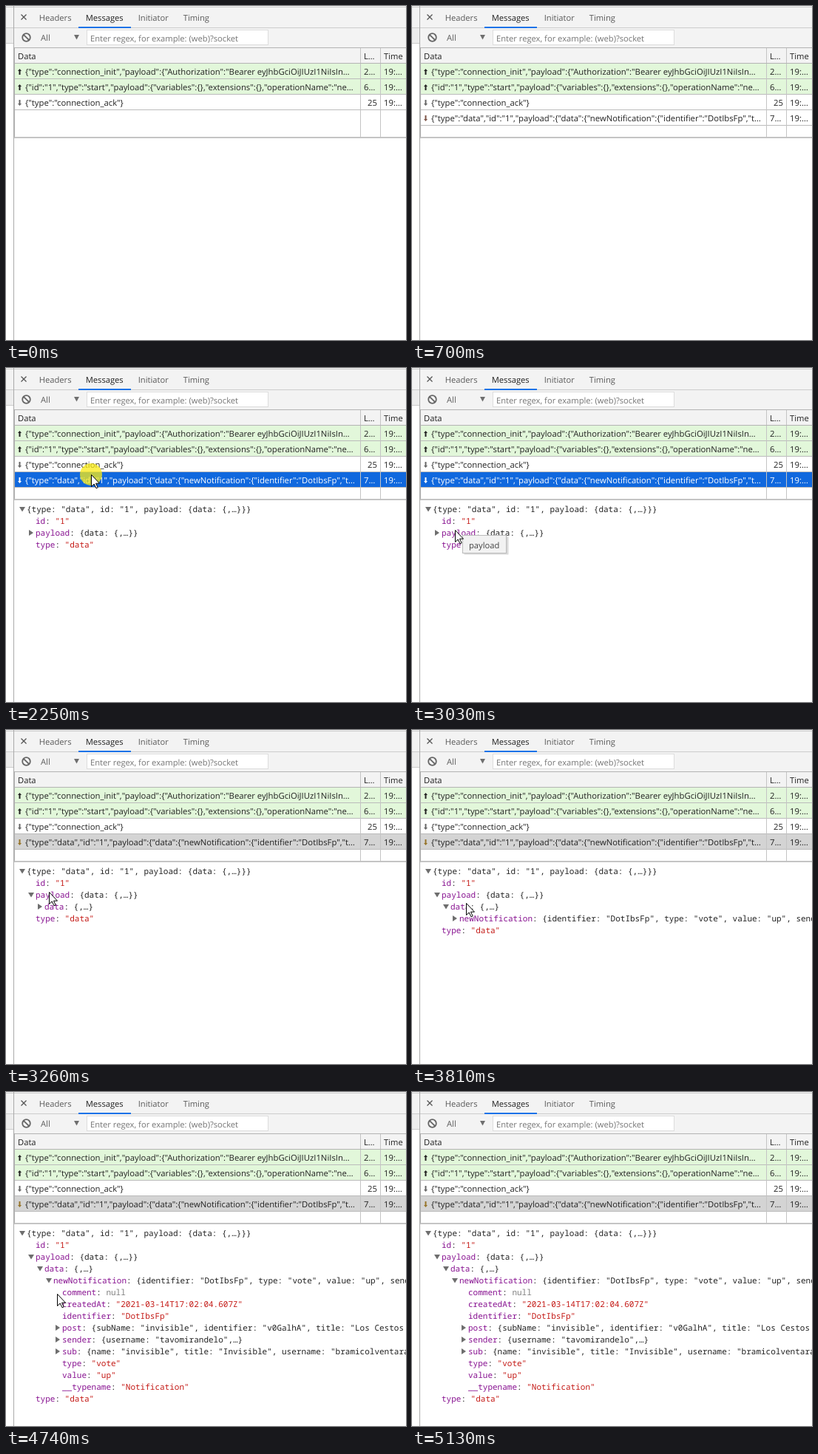
Write an HTML page that moves like this. It is 541 px wide and 452 px high and loops after 6290 ms.

```html
<!DOCTYPE html>
<html lang="en">
<head>
<meta charset="utf-8">
<title>Socket messages</title>
<style>
  html, body { margin: 0; width: 100%; height: 100%; overflow: hidden; background: #fff; }
  svg { display: block; }
  text { font: 11.2px "Open Sans", "Noto Sans", sans-serif; fill: #222; text-rendering: geometricPrecision; }
  .tab { fill: #5a5a5a; }
  .hint { fill: #757575; }
  #rows text { font-size: 11.3px; }
  #tree text { font: 11px "Noto Sans Mono", "Liberation Mono", monospace; }
  .key { fill: #881391; }
  .string { fill: #c41a16; }
  .null { fill: #808080; }
</style>
</head>
<body>
<svg width="541" height="452" viewBox="0 0 541 452">
  <rect width="541" height="452" fill="#fff"/>
  <!-- request list edge -->
  <path d="M0 0h10v29h-10z" fill="#f3f3f3"/>
  <path d="M0 30h10v20h-10z" fill="#ededed"/>
  <path d="M0 29.5h10M0 50.5h10" stroke="#ccc"/>
  <!-- tabs and filter bar -->
  <path d="M11 0h530v77h-530z" fill="#f3f3f3"/>
  <path d="M0 1.5h541M11 29.5h530" stroke="#ccc"/>
  <path d="M98 28h71v2h-71z" fill="#1a73e8"/>
  <path d="M20.5 11.5l7 7m0-7l-7 7" stroke="#555" stroke-width="1.3"/>
  <text class="tab" x="44.7" y="20">Headers</text>
  <text x="107.7" y="20">Messages</text>
  <text class="tab" x="178.7" y="20">Initiator</text>
  <text class="tab" x="239.7" y="20">Timing</text>
  <g fill="none" stroke="#666" stroke-width="1.8">
    <circle cx="27.5" cy="42.5" r="5.3"/><path d="M23.8 38.8l7.4 7.4"/>
  </g>
  <text class="tab" x="47" y="47">All</text>
  <path d="M92 39h7l-3.5 6.5z" fill="#6e6e6e"/>
  <rect x="109.5" y="32.5" width="245" height="20" fill="#fff" stroke="#ddd"/>
  <text class="hint" x="114" y="48">Enter regex, for example: (web)?socket</text>
  <!-- message grid -->
  <text x="16" y="72">Data</text><text x="484" y="72">L…</text><text x="511" y="72">Time</text>
  <g id="rows"></g>
  <path d="M479.5 57v120M506.5 57v120" stroke="#c4c4c4"/>
  <path d="M11 56.5h530M11 77.5h530M11.5 56v122" stroke="#b4b4b4"/>
  <path d="M11 178h530" stroke="#c4c4c4" stroke-width="2"/>
  <path d="M10.5 0v452" stroke="#aaa"/>
  <g id="tree"></g>
  <g id="tip">
    <rect x="70.5" y="228.5" width="60" height="24" fill="#000" opacity=".15"/>
    <rect x="68.5" y="226.5" width="59" height="24" fill="#f2f2f2" stroke="#bbb"/>
    <text x="77" y="244" style="fill:#444">payload</text>
  </g>
  <g id="pointer">
    <circle id="click" r="15" fill="#faeb14" opacity=".75"/>
    <path d="M.5 .5v16l3.7-3.5 2.8 5.8 2.2-1-2.7-5.6h5z" fill="#fff" stroke="#000"/>
  </g>
</svg>
<script>
const LOOP = 6290, TICK = 77.65;
const $ = id => document.getElementById(id);
const between = (t, a, b) => t >= a && t < b;

// data, length, sent by the client, time shown
const messages = [
  ['{"type":"connection_init","payload":{"Authorization":"Bearer eyJhbGciOiJIUzI1NiIsIn…', '2…', true, 0],
  ['{"id":"1","type":"start","payload":{"variables":{},"extensions":{},"operationName":"ne…', '6…', true, 0],
  ['{"type":"connection_ack"}', '25', false, 0],
  ['{"type":"data","id":"1","payload":{"data":{"newNotification":{"identifier":"DotIbsFp","t…', '7…', false, 700]
];

// depth, key, value, time shown, time expanded
const nodes = [
  [0, '', '{type: "data", id: "1", payload: {data: {,…}}}', 2250, 2250],
  [1, 'id', '"1"', 2250],
  [1, 'payload', '{data: {,…}}', 2250, 3260],
  [2, 'data', '{,…}', 3260, 3810],
  [3, 'newNotification', '{identifier: "DotIbsFp", type: "vote", value: "up", sender: {,…}}', 3810, 4360],
  [4, 'comment', 'null', 4360],
  [4, 'createdAt', '"2021-03-14T17:02:04.607Z"', 4360],
  [4, 'identifier', '"DotIbsFp"', 4360],
  [4, 'post', '{subName: "invisible", identifier: "v0GalhA", title: "Los Cestos de Mimbre"}', 4360],
  [4, 'sender', '{username: "tavomirandelo",…}', 4360],
  [4, 'sub', '{name: "invisible", title: "Invisible", username: "bramicolventara"}', 4360],
  [4, 'type', '"vote"', 4360],
  [4, 'value', '"up"', 4360],
  [4, '__typename', '"Notification"', 4360],
  [1, 'type', '"data"', 2250]
];

// pointer stops: tick, x, y
const path = [
  [15, 29, 420], [20, 89, 207], [22, 95, 165], [24, 115, 144], [33, 115, 144], [36, 58, 219],
  [42, 58, 219], [45, 73, 234], [49, 73, 234], [53, 80, 257], [60, 80, 257], [65, 27, 336]
];
const clicks = [[2250, 2420], [3110, 3260], [3660, 3810], [4190, 4360]];

function rowSvg([data, size, sent], i, t) {
  const y = 78 + 21 * i, last = i === 3;
  const selected = last && between(t, 2250, 3110), dimmed = last && t >= 3110;
  const fill = selected ? '#1068de' : dimmed ? '#d4d4d4' : sent ? '#e2f7da' : '#fff';
  const ink = selected ? '#fff' : '#222';
  const arrow = selected ? '#fff' : dimmed ? '#96752a' : last ? '#7d5548' : sent ? '#222' : '#666';
  const label = (x, s, anchor = 'start') =>
    `<text x="${x}" y="${y + 15}" style="fill:${ink}" text-anchor="${anchor}">${s}</text>`;
  return `<path d="M12 ${y}h529v20h-529z" fill="${fill}"/><path d="M12 ${y + 20.5}h529" stroke="#bbb"/>
    <path transform="translate(18.5 ${y + 11}) scale(1 ${sent ? 1 : -1})" d="M0-4l2.5 3h-1.5v5h-2v-5h-1.5z" fill="${arrow}"/>
    ${label(26, data)}${i === 2 ? label(502, size, 'end') : label(484, size)}${label(511, '19:…')}`;
}

function nodeSvg([depth, key, value, , opened = Infinity], i, t) {
  const x = 28 + 12 * depth, y = 195 + 16 * i;
  const kind = value[0] === '"' ? 'string' : value[0] === '{' ? 'object' : 'null';
  const shape = t >= opened ? `M${x - 10} ${y - 7}h8l-4 6.5z` : `M${x - 9} ${y - 8}v8l6-4z`;
  return (kind === 'object' ? `<path d="${shape}" fill="#6e6e6e"/>` : '') +
    `<text x="${x}" y="${y}">${key && `<tspan class="key">${key}</tspan>: `}<tspan class="${kind}">${value}</tspan></text>`;
}

function pointerAt(tick) {
  const i = Math.max(1, path.findIndex(p => p[0] >= tick));
  const [a, b] = [path[i - 1], path[i]];
  const k = (tick - a[0]) / (b[0] - a[0]);
  return [1, 2].map(n => Math.round(a[n] + (b[n] - a[n]) * k));
}

const fillList = (id, items, toSvg, t) => {
  $(id).innerHTML = items.filter(item => t >= item[3]).map((item, i) => toSvg(item, i, t)).join('');
};

const changes = [700, 2250, 3110, 3260, 3810, 4360];
let stage = -1;

function draw() {
  const t = performance.now() % LOOP;
  const now = changes.filter(c => t >= c).length;
  if (now !== stage) {
    stage = now;
    fillList('rows', messages, rowSvg, t);
    fillList('tree', nodes, nodeSvg, t);
  }
  const tick = Math.floor((t + 5) / TICK);
  const visible = between(tick, 15, 66);
  $('pointer').style.display = visible ? '' : 'none';
  if (visible) $('pointer').setAttribute('transform', `translate(${pointerAt(tick)})`);
  $('click').style.display = clicks.some(c => between(t, ...c)) ? '' : 'none';
  $('tip').style.display = between(t, 2880, 3110) ? '' : 'none';
  $('tip').style.opacity = t < 3030 ? .6 : 1;
  requestAnimationFrame(draw);
}
draw();
</script>
</body>
</html>
```
